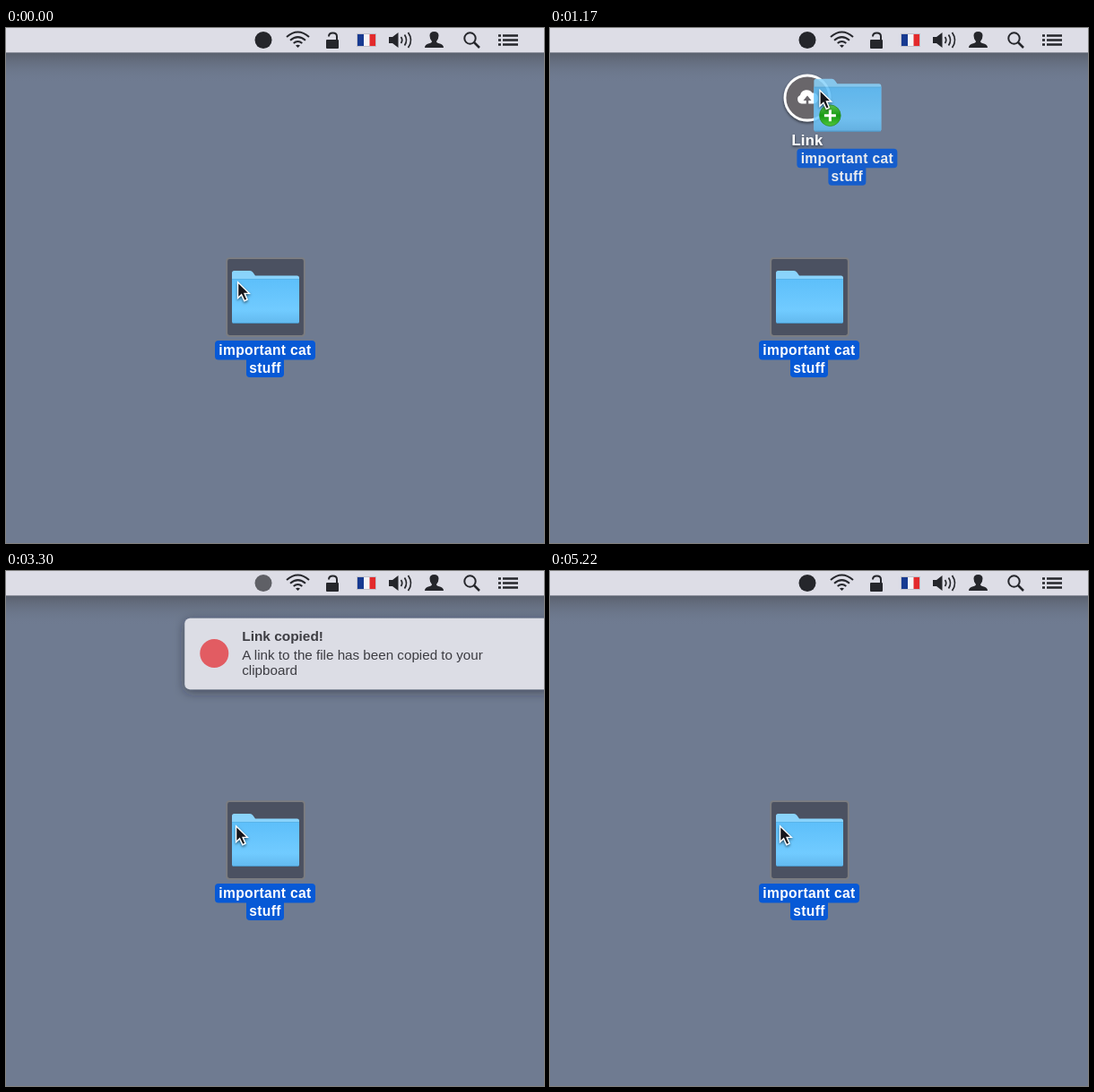
Write an HTML page that moves like this. It is 600 by 575 pixels and loops after 5250 ms.

```html
<!DOCTYPE html>
<html lang="en">
<head>
<meta charset="utf-8">
<title>Drag to link</title>
<style>
html, body { margin: 0; width: 100%; height: 100%; overflow: hidden; background: #6f7b91; }
svg { display: block; width: 600px; height: 575px; font-family: "Liberation Sans", Arial, sans-serif; }
.bold { font-weight: bold; }
.label { font-size: 15.6px; letter-spacing: .35px; fill: #fff; text-anchor: middle; }
.line { fill: none; stroke: #25262b; stroke-width: 2; }
</style>
</head>
<body>
<svg viewBox="0 0 600 575">
  <defs>
    <linearGradient id="shade" x2="0" y2="1">
      <stop stop-color="#555b66" stop-opacity=".85"/>
      <stop offset=".35" stop-color="#5d6472" stop-opacity=".5"/>
      <stop offset="1" stop-color="#6f7b91" stop-opacity="0"/>
    </linearGradient>
    <linearGradient id="blue" x2="0" y2="1">
      <stop stop-color="#5dbffa"/>
      <stop offset=".7" stop-color="#71cbff"/>
      <stop offset="1" stop-color="#62b9ee"/>
    </linearGradient>
    <linearGradient id="green" x2="0" y2="1">
      <stop stop-color="#5cc04c"/>
      <stop offset=".5" stop-color="#159a12"/>
      <stop offset="1" stop-color="#4fc63c"/>
    </linearGradient>
    <filter id="soft" x="-20%" y="-40%" width="140%" height="190%">
      <feDropShadow dx="0" dy="3" stdDeviation="6" flood-color="#20242c" flood-opacity=".5"/>
    </filter>
    <filter id="tight" x="-40%" y="-40%" width="180%" height="180%">
      <feDropShadow dx="0" dy="1.5" stdDeviation="1.5" flood-color="#000" flood-opacity=".6"/>
    </filter>
    <g id="folder">
      <path d="M252 328V273.500Q252 271 254.500 271H272Q274 271 275.500 273L278 276.500H324.500Q327 276.500 327 279V328Z" fill="#8ad3fb"/>
      <path d="M252 280H327V327.500Q327 330 324.500 330H254.500Q252 330 252 327.500Z" fill="url(#blue)"/>
      <path d="M253 329.500H326" stroke="#4a94c4"/>
      <path d="M252 280.500H327" stroke="#59b4ea"/>
    </g>
    <g id="name">
      <rect x="233" y="349" width="112" height="21.500" rx="4" fill="#0759d6"/>
      <rect x="268" y="366" width="42" height="24" rx="4" fill="#0759d6"/>
      <text class="label bold" x="289" y="365">important cat</text>
      <text class="label bold" x="289" y="385">stuff</text>
    </g>
  </defs>

  <rect width="600" height="575" fill="#6f7b91"/>
  <rect y="27" width="600" height="34" fill="url(#shade)"/>
  <rect width="600" height="27.400" fill="#dddde6"/>

  <circle id="tray" cx="287" cy="13.500" r="9.500" fill="#25262b"/>
  <g class="line">
    <path d="M313 10Q325.500 -1 338 10M317 13.700Q325.500 6.500 334 13.700M320.700 17Q325.500 13 330.300 17"/>
    <path d="M323 19.500Q325.500 17.800 328 19.500L325.500 22Z" fill="#25262b" stroke="none"/>
    <rect x="357" y="13" width="14" height="10" rx="1" fill="#25262b" stroke="none"/>
    <path d="M360 9.500Q360 5.500 364.500 5.500Q369 5.500 369 9.500V14"/>
    <path d="M427 10H431L437.500 5V22L431 17H427Z" fill="#25262b" stroke="none"/>
    <path d="M440.500 10Q443 13.500 440.500 17M444.500 7.500Q448.500 13.500 444.500 19.500M448.500 5Q454.500 13.500 448.500 22" stroke-width="1.700"/>
    <path d="M467 22Q467 18.500 471 17.500Q475 16.500 475 15Q472.500 12.500 472.500 8.500Q472.500 4 477.500 4Q482.500 4 482.500 8.500Q482.500 12.500 480 15Q480 16.500 484 17.500Q488 18.500 488 22Z" fill="#25262b" stroke="none"/>
    <circle cx="517.500" cy="11.500" r="6.200"/>
    <path d="M522 16L528 22" stroke-width="2.500"/>
    <path d="M554 8.500H571M554 13.500H571M554 18.500H571M549 8.500H552M549 13.500H552M549 18.500H552" stroke-width="2.300"/>
  </g>
  <rect x="391.500" y="6.500" width="21" height="14" fill="#f4f4f6" stroke="#c0c0ca"/>
  <path d="M392 7H399V20H392Z" fill="#173a91"/>
  <path d="M405.500 7H412V20H405.500Z" fill="#e32a2c"/>

  <rect x="246.200" y="257.200" width="86.600" height="86.600" rx="3" fill="#4b5161" stroke="#7c7d80" stroke-width="1.800"/>
  <use href="#folder"/>
  <use href="#name"/>

  <g id="drop">
    <circle cx="287" cy="78" r="25" fill="#69666b" stroke="#fff" stroke-width="2.800" filter="url(#tight)"/>
    <path d="M280.500 84.500A5 5 0 0 1 279 75A7.500 7.500 0 0 1 292.500 72.500A6 6 0 0 1 294 84.500Z" fill="#fff"/>
    <path d="M287 75.500L291.500 81H288.300V87.500H285.700V81H282.500Z" fill="#69666b"/>
    <text class="bold" x="287" y="131" font-size="16.500" letter-spacing=".3" text-anchor="middle" fill="#fff" filter="url(#tight)">Link</text>
  </g>

  <g id="note" filter="url(#soft)">
    <rect y="52.700" width="409" height="79.600" rx="6" fill="#dcdde5"/>
    <circle cx="33" cy="92" r="16" fill="#e25b62"/>
    <text class="bold" x="64" y="78" font-size="15.400" fill="#3c3c42">Link copied!</text>
    <g font-size="15.200" fill="#3c3c42">
      <text x="64" y="98.500">A link to the file has been copied to your</text>
      <text x="64" y="116">clipboard</text>
    </g>
  </g>

  <g id="ghost">
    <use href="#folder" opacity=".86"/>
    <use href="#name" opacity=".86"/>
  </g>
  <g id="pointer">
    <g id="plus">
      <circle cx="12" cy="29" r="11.800" fill="url(#green)" stroke="#2e8a28" stroke-width=".8"/>
      <path d="M12 22.500V35.500M5.500 29H18.500" stroke="#fff" stroke-width="3"/>
    </g>
    <path d="M.6 .8V18.500L4.600 14.700L7.900 21.600L11 20.200L8 13.300H13.300Z" fill="#15161a" stroke="#fff" stroke-width="1.300" filter="url(#tight)"/>
  </g>
</svg>
<script>
const LOOP = 5250, GRAB = [258, 283];
const $ = id => document.getElementById(id);
const part = (t, a, b) => Math.min(1, Math.max(0, (t - a) / (b - a)));
const smooth = u => u < .5 ? 2 * u * u : 1 - 2 * (1 - u) ** 2;
const out = u => 1 - (1 - u) ** 3;
const move = (el, x, y) => $(el).setAttribute("transform", `translate(${x} ${y})`);
const show = (el, alpha) => $(el).setAttribute("opacity", alpha);

// Pointer stops: start time, end time, x, y
const stops = [
  [90, 600, 289, -4],
  [780, 1380, 304, 92],
  [2130, 2670, 256, 284]
];

function pointerAt(t) {
  let [x, y] = GRAB;
  for (const [a, b, tx, ty] of stops) {
    const u = smooth(part(t, a, b));
    x += (tx - x) * u;
    y += (ty - y) * u;
  }
  return [x, y];
}

function draw(now) {
  const t = now % LOOP;
  const [x, y] = pointerAt(t);
  const dragging = t >= 90 && t < 1890;
  move("pointer", x, y);
  move("ghost", x - GRAB[0], y - GRAB[1]);
  show("ghost", +dragging);
  show("plus", +(dragging && t >= 540));

  const open = out(part(t, 540, 852));
  const close = part(t, 1920, 2130);
  move("drop", -4 * (1 - open), -40 * (1 - open) - 12 * close);
  show("drop", open * (1 - close));

  const busy = t >= 1950 && t < 4320;
  show("tray", busy ? .58 + .12 * Math.sin((t - 2850) / 450 * Math.PI - 1) : 1);

  const shown = out(part(t, 3087, 3455)) - smooth(part(t, 4760, 5200));
  move("note", 620 - 454 * shown, 0);
  show("note", +(shown > 0));
}

const start = performance.now();
function tick() {
  draw(performance.now() - start);
  requestAnimationFrame(tick);
}
tick();
</script>
</body>
</html>
```
